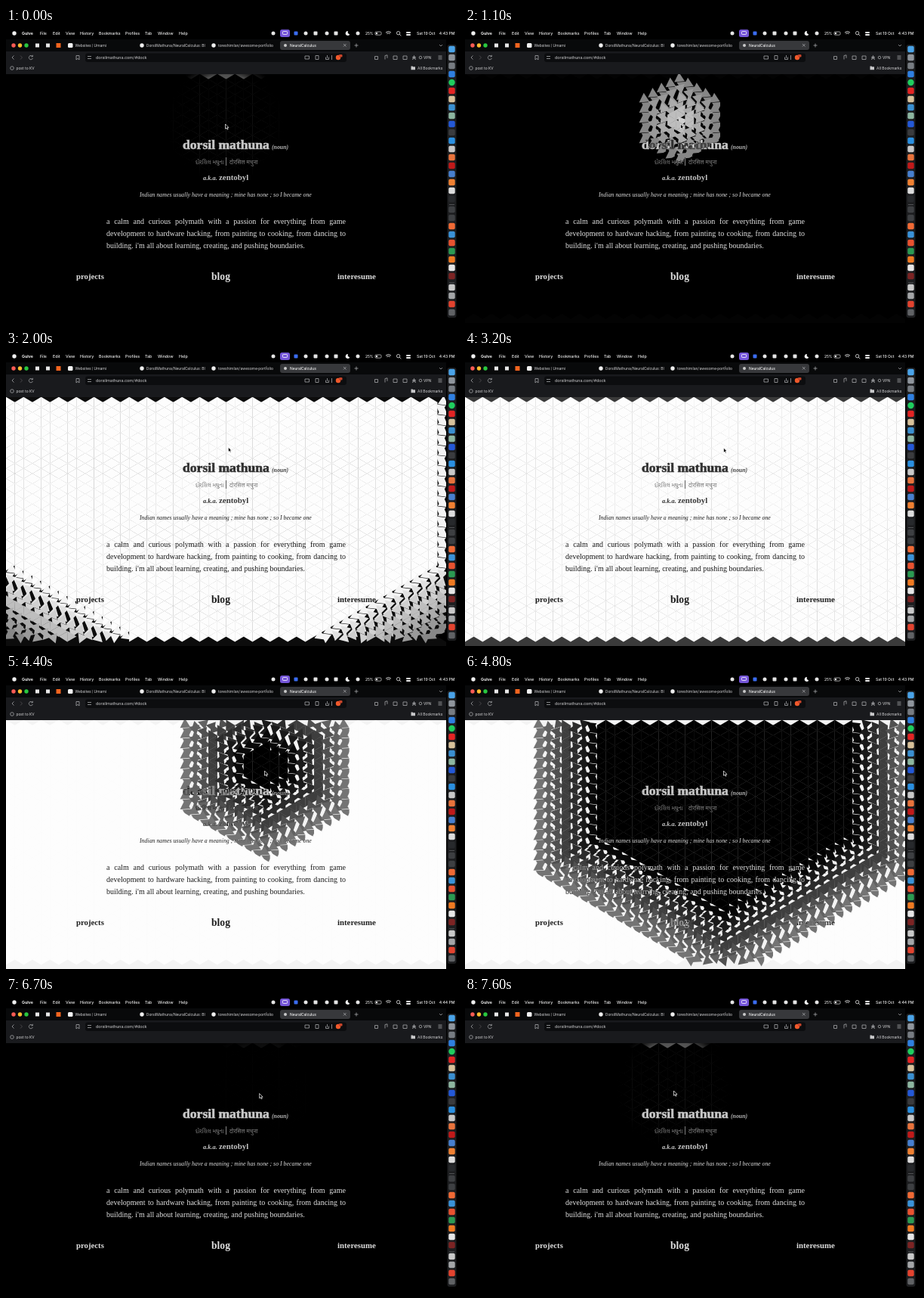
An HTML page with a canvas that plays this animation: 600x390 px, repeating every 7700 ms.

```html
<!DOCTYPE html>
<html lang="en">
<head>
<meta charset="utf-8">
<title>Triangle mesh page</title>
<style>
  html, body { margin: 0; width: 100%; height: 100%; overflow: hidden; background: #000; }
  #stage { position: relative; width: 600px; height: 390px; overflow: hidden; isolation: isolate; background: #000; }
  #stage > * { position: absolute; left: 0; top: 0; }
  #stage > #mesh { top: 61px; }
  #copy, #bio { mix-blend-mode: difference; font-family: "Liberation Serif", "Times New Roman", serif; }
  #copy { fill: #dcdcdc; }
  #copy .bold { font-weight: bold; }
  #copy .slant { font-style: italic; }
  #copy .soft { font: 7.3px "Noto Sans Gujarati", "Noto Sans Devanagari", "Noto Sans", sans-serif; fill: #858585; }
  #stage > #bio { left: 133px; top: 248px; width: 317px; margin: 0; color: #e2e2e2; font-size: 10px; line-height: 16px; }
  #bio span { display: block; white-space: nowrap; text-align-last: justify; }
  #bio span:last-child { text-align-last: left; }
  #ui { font: 5.2px Roboto, sans-serif; fill: #c8c8ca; }
  #ui .menu { font: 500 5.3px Inter, sans-serif; fill: #f0f0f0; }
  #ui .line { fill: none; stroke: #a4a5a8; stroke-width: .8; }
</style>
</head>
<body>
<div id="stage">
  <canvas id="mesh" width="583" height="329"></canvas>

  <svg id="copy" width="600" height="390">
    <text class="bold" x="234" y="160" font-size="17.6" fill="#c8c8c8" stroke="#c8c8c8" stroke-width=".6">dorsil mathuna</text>
    <text class="bold slant" x="352" y="159.5" font-size="7.8" fill="#b4b4b4">(noun)</text>
    <text class="soft" x="251" y="180">દોરસિલ મથુના</text>
    <rect id="bar" x="291" y="171" width=".8" height="11" fill="#aaa"/>
    <text class="soft" x="296" y="180">दोरसिल मथुना</text>
    <text class="bold slant" x="261" y="201" font-size="8.4" fill="#c8c8c8">a.k.a.</text>
    <text class="bold" x="282" y="201" font-size="10.9" fill="#c0c0c0">zentobyl</text>
    <text class="slant" x="177" y="223" font-size="7.85">Indian names usually have a meaning ; mine has none ; so I became one</text>
    <text class="bold" x="93" y="332" font-size="10.75">projects</text>
    <text class="bold" x="272" y="333" font-size="13.6">blog</text>
    <text class="bold" x="439" y="332" font-size="10.8">interesume</text>
  </svg>

  <p id="bio">
    <span>a calm and curious polymath with a passion for everything from game</span>
    <span>development to hardware hacking, from painting to cooking, from dancing to</span>
    <span>building. i'm all about learning, creating, and pushing boundaries.</span>
  </p>

  <svg id="ui" width="600" height="390">
    <rect width="600" height="15" fill="#000"/>
    <rect y="15" width="583" height="16" fill="#08090a"/>
    <rect y="31" width="583" height="30" fill="#191a1d"/>
    <rect x="363" y="17" width="93" height="12" rx="3" fill="#37383b"/>
    <rect x="105" y="33.5" width="346" height="11.5" rx="3" fill="#0c0d0f"/>
    <rect x="583" y="15" width="17" height="375" fill="#000"/>
    <rect x="584.5" y="22" width="12" height="361" rx="3" fill="#1d1e20"/>

    <g id="menu" class="menu">
      <circle cx="11" cy="7" r="2.7"/>
      <text x="21" y="9" font-weight="700">Gulve</text>
      <rect x="363" y="2" width="13" height="10" rx="2.5" fill="#7455d8"/>
      <rect x="366.5" y="4.5" width="6" height="4" rx=".8" fill="none" stroke="#fff" stroke-width=".8"/>
      <path d="M453 4a3 3 0 1 0 2.3 4.5A3.2 3.2 0 0 1 453 4z"/>
      <text x="476" y="9" font-size="4.8">25%</text>
      <rect x="489" y="5" width="8" height="4.2" rx="1.2" fill="none" stroke="#ddd" stroke-width=".7"/>
      <rect x="490" y="6" width="2" height="2.2"/>
      <path d="M503 6q3.5-3 7 0M504.4 7.6q2.1-1.8 4.2 0" fill="none" stroke="#eee" stroke-width=".9"/>
      <path d="M521.3 8.3l2 2M521.8 6.7a2.2 2.2 0 1 1-4.4 0a2.2 2.2 0 0 1 4.4 0" fill="none" stroke="#eee" stroke-width=".8"/>
      <text x="544" y="9" font-size="5.1">Sat 19 Oct</text>
      <text x="594.5" y="9" font-size="5.1" text-anchor="end" id="clock"></text>
    </g>

    <g id="tabs">
      <circle cx="10" cy="23" r="2.7" fill="#fb5c55"/>
      <circle cx="18.5" cy="23" r="2.7" fill="#fdbc2f"/>
      <circle cx="27" cy="23" r="2.7" fill="#29c83f"/>
      <rect x="39" y="20.5" width="5" height="5" fill="#e8e8e8"/>
      <rect x="53" y="20.5" width="5" height="5" fill="#e8e8e8"/>
      <rect x="66.5" y="20" width="6" height="6" fill="#f4651f"/>
      <rect x="82" y="20" width="6.5" height="6" rx="1.5" fill="#f2f2f2"/>
      <text x="91.5" y="25">Websites | Umami</text>
      <circle cx="180" cy="23" r="2.7" fill="#eee"/>
      <text x="186" y="25">DorsilMathuna/NeuralCalculus: Bl</text>
      <circle cx="275" cy="23" r="2.7" fill="#eee"/>
      <text x="281" y="25">toreshimlan/awesome-portfolio</text>
      <circle cx="370" cy="23" r="2" fill="#c9c9c9"/>
      <text x="376" y="25" fill="#fff">NeuralCalculus</text>
      <path class="line" d="M447 21l3.500 3.500m0-3.500l-3.500 3.500M464 20.500v5m-2.500-2.500h5M574 22l2 2l2-2"/>
    </g>

    <g id="tools">
      <path class="line" d="M10.500 36.500l-2.500 2.500l2.500 2.500M35 37.500a2.600 2.600 0 1 0 .4 2.500M35.400 35.800v2h-2M93 36.500h4v5.500l-2-1.700l-2 1.700z"/>
      <path class="line" d="M19 36.500l2.500 2.500l-2.500 2.500" opacity=".4"/>
      <path class="line" d="M108 37.500h5M108 40.500h5M396 37h5.500v4h-5.500zM410 36.500h4v5h-4zM423.500 38.500v3h4v-3M425.500 40v-4M431.500 36v6"/>
      <circle cx="440" cy="39" r="3.200" fill="#f0592b"/>
      <rect x="441" y="35" width="4.500" height="3.500" rx="1" fill="#c8442a"/>
      <text x="119" y="41" font-size="5.7">dorsilmathuna.com/#dock</text>
      <path class="line" d="M488.500 37.500h4v4h-4zM502 41.500v-5l3-.7v4M513 37h5v4.500h-5zM526 37h5v4.500h-5zM538.500 41.500l2-5l2 5l-4-3h4zM572.500 37h5m-5 2h5m-5 2h5"/>
      <circle cx="549" cy="39" r="1.800" class="line"/>
      <text x="553" y="41">VPN</text>
      <circle cx="8" cy="53" r="2.300" class="line"/>
      <text x="13.500" y="55">post to KV</text>
      <path d="M536.500 50.500h2l.8.8h2.700v4h-5.500z"/>
      <text x="545" y="55">All Bookmarks</text>
    </g>
    <g id="dock"></g>
  </svg>

  <svg id="cursor" width="10" height="12">
    <path d="M1 1v6.300l1.500-1.300l1 2.200l1.100-.5l-1-2.100h1.900z" fill="#000" stroke="#fff" stroke-width=".7"/>
  </svg>
</div>

<script>
const LOOP = 7700, STEP = 100;
const W = 583 / 50, HALF = W / Math.sqrt(3);
const COLS = 50, ROWS = 47, SEED_ROW = 9;
const LAG = 33.3, RING = 7, MID = 125;
const waves = [
  { at: 950, col: 24, tone: 253 },
  { at: 4083, col: 29, tone: 0 }
];
const el = id => document.getElementById(id);
const ctx = el('mesh').getContext('2d');
const clamp = v => Math.min(1, Math.max(0, v));
const mix = (a, b, k) => a + (b - a) * k;
const gray = v => { const n = Math.round(v); return `rgb(${n},${n},${n})`; };

// Keys are [time, value] pairs in order of time.
function track(keys, t, ease = k => k) {
  const i = keys.findIndex(k => k[0] > t);
  if (i < 0) return keys[keys.length - 1][1];
  if (i === 0) return keys[0][1];
  const [t0, a] = keys[i - 1], [t1, b] = keys[i];
  return mix(a, b, ease((t - t0) / (t1 - t0)));
}
const smooth = k => k * k * (3 - 2 * k);

const backTone = [[900, 0], [1500, 10], [2700, 14], [3200, 58], [4000, 243], [5500, 243], [5700, 220], [6700, 0]];
const glowLevel = [[0, 1], [850, 1], [1050, 0], [6600, 0], [7200, 1]];
const mouseX = [[0, 290.5], [900, 285.5], [1700, 285.5], [2900, 342.5], [6500, 342.5], [7500, 276.5]];
const mouseY = [[0, 126], [1700, 126], [2900, 127], [6500, 127], [7500, 123]];

// Each triangle turns about the middle of its box, so half a turn tiles the column again.
function triangle(x, y, side, turn, tone) {
  const cos = Math.cos(turn), sin = Math.sin(turn);
  const dx = side * W * .51, dy = HALF * 1.05;
  ctx.setTransform(cos, sin, -sin, cos, x, y);
  ctx.fillStyle = gray(tone);
  ctx.beginPath();
  ctx.moveTo(dx, 0);
  ctx.lineTo(-dx, -dy);
  ctx.lineTo(-dx, dy);
  ctx.fill();
}

function cellState(t, c, h) {
  let tone = 0, k = 1;
  for (const wave of waves) {
    const dc = Math.abs(c - wave.col), dh = Math.abs(h - SEED_ROW);
    const d = Math.max(dc, Math.ceil((dc + dh) / 2));
    const p = ((t - wave.at) / LAG - d) / RING;
    if (p < 0) break;
    k = clamp(p);
    tone = mix(MID, wave.tone, k);
  }
  return { tone, turn: k * Math.PI * 2 };
}

function drawMesh(t, mx, my) {
  ctx.resetTransform();
  ctx.fillStyle = gray(track(backTone, t));
  ctx.fillRect(0, 0, 583, 329);
  const glow = track(glowLevel, t);
  if (glow > 0) {
    const g = ctx.createRadialGradient(mx, my, 0, mx, my, 85);
    g.addColorStop(0, `rgba(150,150,150,${glow})`);
    g.addColorStop(.75, `rgba(80,80,80,${glow})`);
    g.addColorStop(1, 'rgba(0,0,0,0)');
    ctx.fillStyle = g;
    ctx.fillRect(0, 0, 583, 329);
  }
  for (let c = 0; c < COLS; c++) {
    for (let h = 1; h <= ROWS; h++) {
      const { tone, turn } = cellState(t, c, h);
      triangle((c + .5) * W, h * HALF, c % 2 === h % 2 ? -1 : 1, turn, tone);
    }
  }
}

function add(parent, tag, attrs, text) {
  const node = document.createElementNS(parent.namespaceURI, tag);
  for (const name in attrs) node.setAttribute(name, attrs[name]);
  if (text) node.textContent = text;
  parent.appendChild(node);
}

const menu = { File: 45, Edit: 62, View: 79, History: 98, Bookmarks: 123, Profiles: 158, Tab: 184, Window: 201, Help: 229 };
for (const name in menu) add(el('menu'), 'text', { x: menu[name], y: 9 }, name);
[354, 384, 397, 410, 425, 437, 466].forEach((x, i) => add(el('menu'), 'rect',
  { x: x - 2.5, y: 4.5, width: 5, height: 5, rx: i % 2 ? 1 : 2.5, fill: i === 1 ? '#3b6cf0' : '#e4e4e4' }));
for (const y of [5, 8]) add(el('menu'), 'rect', { x: 530, y, width: 6, height: 2, rx: 1 });

const apps = ('#4aa3e8 #8f959c #777c82 #2f7fe0 #1fce5e #e32424 #d8c19a #3a8fd0 #8db6a0 #2458d6 #3a3b3e ' +
  '#2a8fe0 #c8c8c8 #e8733c #c01a1a #477fce #f08032 #dcdcdc #27292c #3d3f42 #3d3f42 #f06a35 ' +
  '#3a92d8 #e85230 #2b9a52 #f07a22 #e6e6e6 #7c2424 #c9c9c9 #a4a6a8 #e2432f #606265').split(' ');
apps.forEach((fill, i) => {
  const y = 28 + i * 11 + (i > 18 ? 3 : 0) + (i > 27 ? 4 : 0);
  add(el('dock'), 'rect', { x: 586.3, y: y - 4.2, width: 8.4, height: 8.4, rx: i === 4 ? 4.2 : 2, fill });
});
for (const y of [233, 336.5]) add(el('dock'), 'rect', { x: 587, y, width: 7, height: .7, fill: '#66686b' });

const start = performance.now();
let last = -1;
function frame() {
  const t = Math.floor((performance.now() - start) % LOOP / STEP) * STEP;
  if (t !== last) {
    last = t;
    const x = track(mouseX, t, smooth), y = track(mouseY, t, smooth);
    drawMesh(t, x, y - 61);
    el('cursor').style.transform = `translate(${x - 1}px, ${y}px)`;
    el('bar').style.opacity = t >= 4300 && t < 6500 ? 0 : 1;
    el('clock').textContent = t < 6500 ? '4:43 PM' : '4:44 PM';
  }
  requestAnimationFrame(frame);
}
frame();
</script>
</body>
</html>
```
